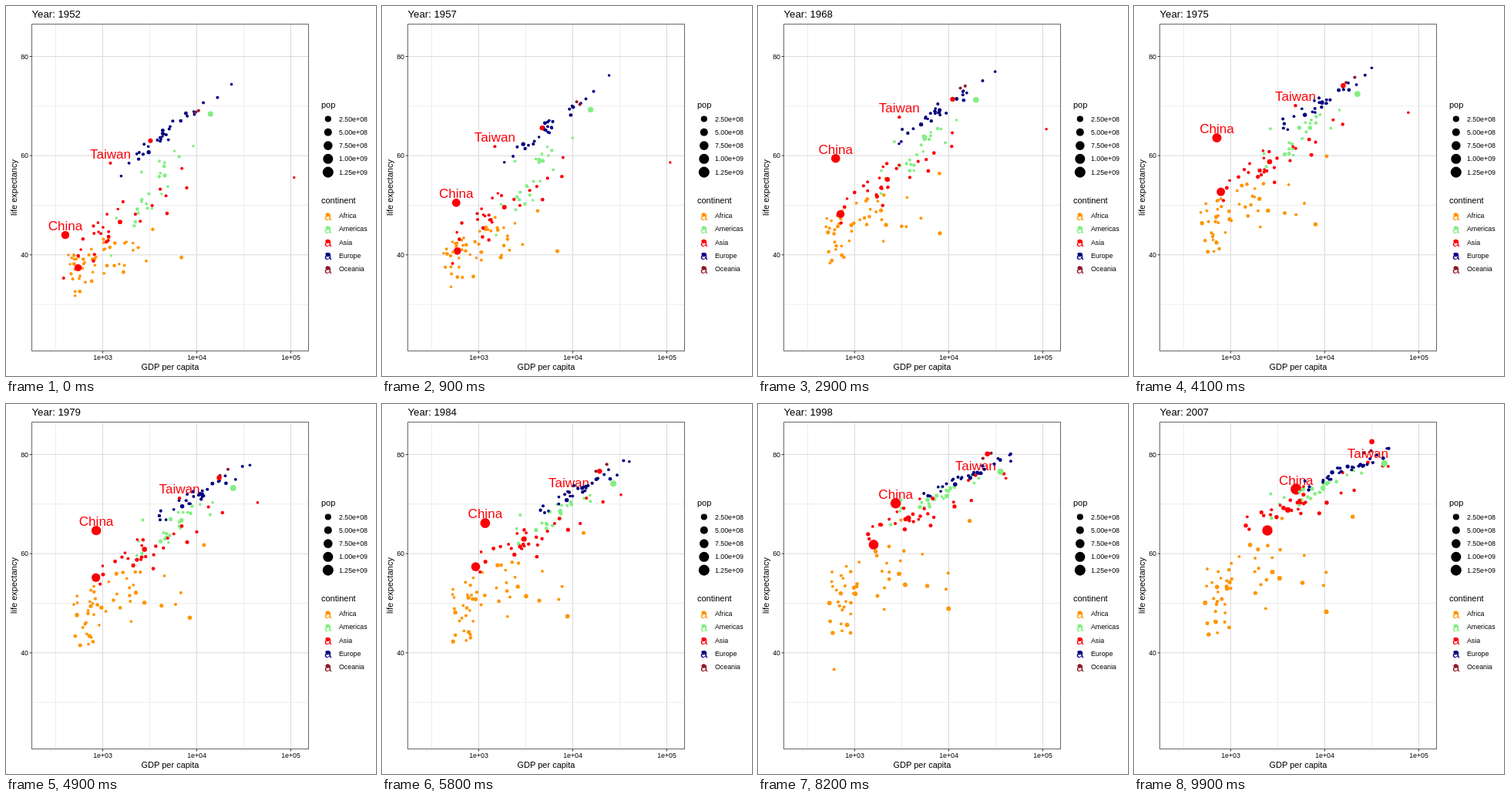
Animation, 480 px wide and 480 px high, one loop 10000 ms. Source, as an HTML page:

```html
<!DOCTYPE html>
<html lang="en">
<head>
<meta charset="utf-8">
<title>Life expectancy and GDP</title>
<style>
html, body { margin: 0; width: 100%; height: 100%; overflow: hidden; background: #fff; }
svg { display: block; width: 480px; height: 480px; font-family: "Liberation Sans", Arial, sans-serif; }
</style>
</head>
<body>
<svg id="stage" viewBox="0 0 480 480"></svg>
<script>
const FRAMES = 100, FRAME_MS = 100, FIRST = 1952, LAST = 2007, STEP = 5;
const stage = document.getElementById('stage');

// Each continent is a cloud: [mean log gdp, spread, mean life, spread] in the first and last year.
// tie: how closely life follows gdp; pow: how early the progress comes.
const continents = {
  Africa:   { color: '#ff9500', n: 51, from: [2.99, .27, 39, 4.2], to: [3.19, .36, 54.5, 7.4], tie: .4, skew: .25, pow: 2, growth: 3 },
  Americas: { color: '#83ee83', n: 24, from: [3.5, .19, 53, 8], to: [3.88, .26, 73.2, 3.4], tie: .6, skew: 0, pow: 1.5, growth: 2.3 },
  Asia:     { color: '#fb0007', n: 28, from: [3.18, .35, 46.5, 7.5], to: [3.8, .47, 70.7, 5.5], tie: .6, skew: .15, pow: 1.4, growth: 2.5 },
  Europe:   { color: '#00007f', n: 30, from: [3.72, .25, 65, 4.6], to: [4.31, .27, 77.3, 2.6], tie: .85, skew: 0, pow: 1.3, growth: 1.25 },
  Oceania:  { color: '#8f1a28', n: 2, from: [4.01, .02, 69.2, .2], to: [4.46, .05, 80.6, .4], tie: 0, skew: 0, pow: 1.4, growth: 2 }
};

const gdpX = log => 125.5 + 122 * (log - 3);
const lifeY = life => 65.5 + 6.433 * (80 - life);
const radius = pop => 1.65 + 5.4 * Math.sqrt(pop / 1250);
const clamp = (v, lo, hi) => Math.max(lo, Math.min(hi, v));
const mix = (a, b, t) => a + (b - a) * t;

function add(tag, attrs, text = '') {
  const el = document.createElementNS('http://www.w3.org/2000/svg', tag);
  for (const key in attrs) el.setAttribute(key, attrs[key]);
  el.textContent = text;
  return stage.appendChild(el);
}
const label = (x, y, size, text, more) => add('text', { x, y, 'font-size': size, ...more }, text);
const line = (d, stroke) => add('path', { d, stroke, fill: 'none' });
const circle = (cx, cy, r, fill) => add('circle', { cx, cy, r, fill });
const middle = { 'text-anchor': 'middle' };

let seed = 11;
function random() {
  seed = seed + 0x6D2B79F5 | 0;
  let t = Math.imul(seed ^ seed >>> 15, 1 | seed);
  t = t + Math.imul(t ^ t >>> 7, 61 | t) ^ t;
  return ((t ^ t >>> 14) >>> 0) / 4294967296;
}
const normal = () => 2 * (random() + random() + random() - 1.5);

// Axes, grid and legends
const xs = [3, 4, 5].map(gdpX), ys = [80, 60, 40].map(lifeY);
function grid(shiftX, shiftY, stroke) {
  for (const x of xs) line(`M${x + shiftX} 24V447`, stroke);
  for (const y of ys) line(`M34 ${y + shiftY}H392`, stroke);
}
grid(-61, 64.33, '#ececec');
grid(0, 0, '#dadada');
add('rect', { x: 33.5, y: 23.5, width: 359, height: 424, fill: 'none', stroke: '#666' });
xs.forEach((x, i) => {
  line(`M${x} 448v2.5`, '#333');
  label(x, 459, 8.8, '1e+0' + (i + 3), middle);
});
ys.forEach((y, i) => {
  line(`M30.7 ${y}h2.5`, '#333');
  label(29, y + 3.2, 8.8, 80 - 20 * i, { 'text-anchor': 'end' });
});
label(213, 472, 11, 'GDP per capita', middle);
label(0, 0, 11, 'life expectancy', { ...middle, transform: 'translate(14 235.5) rotate(-90)' });
const title = label(33.5, 15, 13.2, '');

label(409, 132, 11, 'pop');
['2.50e+08', '5.00e+08', '7.50e+08', '1.00e+09', '1.25e+09'].forEach((text, i) => {
  const y = 146.5 + 17.28 * i;
  circle(417.8, y, radius(250 * (i + 1)), '#000');
  label(432, y + 3.1, 8.8, text);
});
label(409, 256, 11, 'continent');
Object.entries(continents).forEach(([name, { color }], i) => {
  const y = 272 + 17.28 * i;
  circle(417.3, y - 1.2, 2.6, color);
  label(417.8, y + 5.5, 17, 'a', { ...middle, fill: color });
  label(432, y + 3.1, 8.8, name);
});

// Moving dots; a path is a list of [year, log gdp, life]
const dots = [];
function addDot(color, pop0, pop1, path, name) {
  const text = name && label(0, 0, 17.07, name, { ...middle, fill: color });
  dots.push({ path, text, r0: radius(pop0), r1: radius(pop1), el: circle(0, 0, 2, color) });
}

function addCountry({ color, from, to, tie, skew, pow, growth }) {
  const a = normal(), b = normal();
  const a1 = .8 * a + .6 * normal(), b1 = .8 * b + .6 * normal();
  const place = ([g, sg, l, sl], a, b) =>
    [g + sg * (a + skew * (a * a - 1)), l + sl * mix(b, a, tie)];
  const [g0, l0] = place(from, a, b), [g1, l1] = place(to, a1, b1);
  const path = [];
  for (let year = FIRST; year <= LAST; year += STEP) {
    const t = 1 - ((LAST - year) / (LAST - FIRST)) ** pow;
    path.push([
      year,
      clamp(mix(g0, g1, t) + .03 * normal(), 2.45, 4.68),
      clamp(mix(l0, l1, t) + .4 * normal(), 30, 82)
    ]);
  }
  const pop = clamp(5 * Math.exp(1.1 * normal()), 1, 70);
  addDot(color, pop, pop * growth, path);
}

// A country with its own history, from a few [year, gdp, life] turning points
function addHistory(continent, pop0, pop1, keys, name) {
  const path = keys.map(([year, gdp, life]) => [year, Math.log10(gdp), life]);
  addDot(continents[continent].color, pop0, pop1, path, name);
}

addHistory('Asia', 556, 1319, [[1952, 400, 44], [1957, 576, 50.5], [1962, 488, 44.5],
  [1967, 613, 58.4], [1972, 677, 63.1], [1977, 741, 64], [2007, 4959, 73]], 'China');
addHistory('Asia', 8, 23, [[1952, 1207, 58.5], [1962, 1823, 65.2], [1972, 4063, 69.4],
  [1992, 15216, 74.3], [2007, 28718, 78.4]], 'Taiwan');
for (const c of Object.values(continents))
  for (let i = 0; i < c.n; i++) addCountry(c);
addHistory('Asia', 372, 1110, [[1952, 547, 37.4], [1977, 813, 54.2], [1987, 977, 58.6], [2007, 2452, 64.7]]);
addHistory('Asia', .2, 2.5, [[1952, 108382, 55.6], [1972, 109348, 67.7], [1982, 31354, 71.3], [2007, 47307, 77.6]]);
addHistory('Asia', 86, 127, [[1952, 3217, 63], [1972, 14779, 73.4], [2007, 31656, 82.6]]);
addHistory('Americas', 157, 301, [[1952, 13990, 68.4], [2007, 42952, 78.2]]);
addHistory('Africa', 3, 9, [[1952, 493, 40], [1987, 848, 44], [1992, 737, 23.6], [1997, 590, 36.1], [2007, 863, 46.2]]);

function position(path, year) {
  const i = Math.max(1, path.findIndex(([y]) => y >= year));
  const [y0, g0, l0] = path[i - 1], [y1, g1, l1] = path[i];
  const t = (year - y0) / (y1 - y0);
  return [gdpX(mix(g0, g1, t)), lifeY(mix(l0, l1, t))];
}

function move(el, attrs) {
  for (const key in attrs) el.setAttribute(key, attrs[key]);
}

const start = performance.now();
function draw() {
  const frame = Math.floor(Math.max(0, performance.now() - start) / FRAME_MS) % FRAMES;
  const u = frame / (FRAMES - 1), year = Math.min(LAST, mix(FIRST, LAST, u));
  title.textContent = 'Year: ' + Math.round(year);
  for (const { path, text, r0, r1, el } of dots) {
    const [x, y] = position(path, year);
    move(el, { cx: x, cy: y, r: mix(r0, r1, u) });
    if (text) move(text, { x, y: y - 6 });
  }
  requestAnimationFrame(draw);
}
draw();
</script>
</body>
</html>
```
